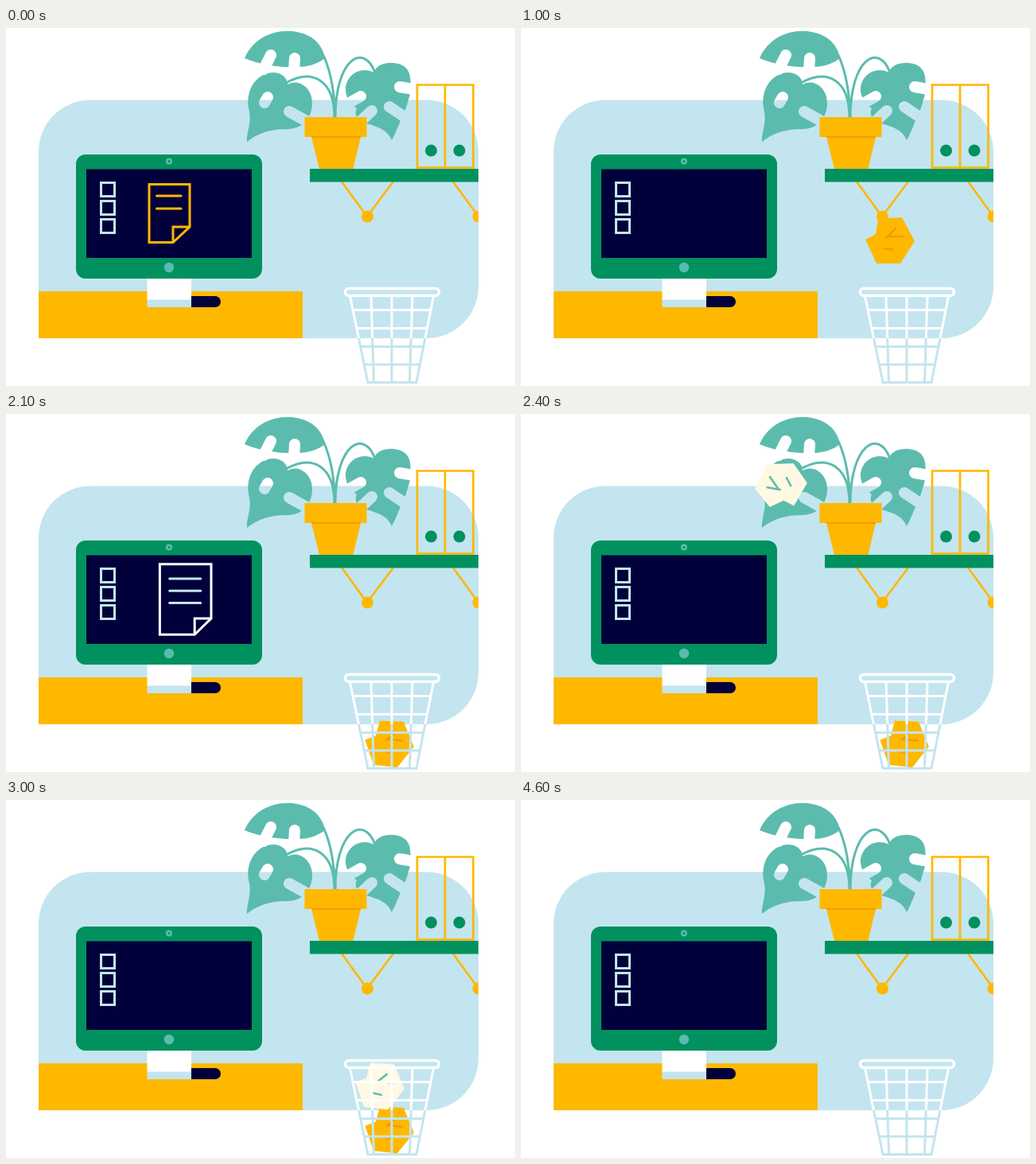
These frames come from a looping animation (640x450 px, 4950 ms). An HTML page:

```html
<!DOCTYPE html>
<html lang="en">
<head>
<meta charset="utf-8">
<title>Paper toss</title>
<style>
  html, body { margin: 0; width: 100%; height: 100%; overflow: hidden; background: #fff; }
  svg { display: block; width: 100%; height: 100%; }
</style>
</head>
<body>
<svg viewBox="0 0 640 450" fill="none">
  <defs>
    <linearGradient id="wire" gradientUnits="userSpaceOnUse" x1="0" y1="0" x2="0" y2="450">
      <stop offset=".8667" stop-color="#fff"/><stop offset=".8667" stop-color="#c3e5ef"/>
    </linearGradient>
    <mask id="cuts" maskUnits="userSpaceOnUse" x="290" y="0" width="230" height="150">
      <path fill="#fff" d="M290 0H520V150H290Z"/>
      <path stroke="#000" stroke-width="14" stroke-linecap="round"
        d="M333 34L324 52M363 38L362 54M329 87L325 94M356 105L376 116M446 86L430 95M460 104L446 117M495 74L512 77M482 99L500 111"/>
    </mask>
    <clipPath id="wall"><path d="M0 0H594V450H0Z"/></clipPath>
    <path id="crumple" d="M-15 -28L15 -30L31 0L13 28L-17 28L-31 -2L-18 -9Z"/>
    <path id="creases" stroke-width="2.5" d="M-5 -4L8 -17M-3 -6L17 -6M-9 9L4 10.5"/>
  </defs>

  <path fill="#c3e5ef" d="M41 390V155A65 65 0 0 1 106 90.500H529A65 65 0 0 1 594 155V325A65 65 0 0 1 529 390Z"/>
  <path fill="#ffb800" d="M41 331H373V390H41Z"/>

  <!-- monitor -->
  <rect x="88" y="159" width="234" height="156" rx="12" fill="#00915f"/>
  <path fill="#02003a" d="M101 177.500H309V289H101ZM233 337H263A7 7 0 0 1 263 351H233Z"/>
  <circle cx="205" cy="167.500" r="4" fill="#5bbcae"/>
  <circle cx="205" cy="167.500" r="1.500" fill="#00915f"/>
  <circle cx="205" cy="301" r="6.200" fill="#5bbcae"/>
  <path fill="#fff" d="M177.500 315H233V342H177.500Z"/>
  <path fill="#c3e5ef" d="M177.500 341.500H233V351H177.500Z"/>
  <path stroke="#c3e5ef" stroke-width="3" d="M119.500 194.500h17v17h-17zm0 23h17v17h-17zm0 23h17v17h-17z"/>

  <!-- plant -->
  <path stroke="#5bbcae" stroke-width="3" d="M413 113C414 86 409 56 399 34M413 113C413 66 386 50 352 69M414 113C414 38 450 18 464 56"/>
  <g fill="#5bbcae" mask="url(#cuts)">
    <path d="M300 38C312 10 342 0 366 5C388 9 399 24 401 38C392 45 380 49 367 49C345 50 318 46 300 38Z"/>
    <path d="M303 143C302 131 310 118 305 101C301 75 317 56 336 56C347 56 354 63 354 71C368 63 385 75 385 94C385 104 382 112 375 119C364 130 350 126 338 128C325 130 313 135 303 143Z"/>
    <path d="M485 141C479 128 470 126 460 122C446 118 436 112 441 101C431 95 426 84 427 74C430 57 447 48 463 56C465 46 478 43 488 44C500 45 507 52 508 61C509 70 510 80 506 90C504 98 502 104 498 112C494 121 490 132 485 141Z"/>
  </g>
  <path fill="#ffb800" d="M375.500 112H453.500V137H446L436.500 177H394L384 137H375.500Z"/>
  <path stroke="#f59b00" stroke-width="2" d="M384 137H446"/>

  <!-- shelf -->
  <g clip-path="url(#wall)">
    <path stroke="#ffb800" stroke-width="2.700" d="M517 71.500H587.500V175.500H517ZM552 71.500V176M422 193L454 237L487 193M562 193L594 237"/>
    <g fill="#ffb800"><circle cx="454.500" cy="237" r="7.500"/><circle cx="594" cy="237" r="7.500"/></g>
    <g fill="#00915f"><circle cx="534.500" cy="154" r="7.500"/><circle cx="570" cy="154" r="7.500"/></g>
    <path fill="#00915f" d="M382 177H594V193.500H382Z"/>
  </g>

  <!-- pages, drawn around their centres -->
  <g id="page0" stroke="#ffb800" stroke-width="3">
    <path d="M-25.500 -36.500H25.500V17L4.500 36.500H-25.500ZM4.500 36.500V17H25.500"/>
    <path stroke-linecap="round" d="M-16 -22H14.500M-16 -6H14.500"/>
  </g>
  <g id="page1" stroke="#fff" stroke-width="3">
    <path d="M-32.300 -44.300H32.300V24L11.500 44.300H-32.300ZM11.500 44.300V24H32.300"/>
    <path stroke="#c3e5ef" stroke-linecap="round" d="M-20 -26H19M-20 -10.700H19M-20 4.600H19"/>
  </g>
  <g id="ball0"><use href="#crumple" fill="#ffb800"/><use href="#creases" stroke="#f59b00"/></g>
  <g id="ball1"><use href="#crumple" fill="#fff9e3"/><use href="#creases" stroke="#5bbcae"/></g>

  <!-- bin -->
  <g stroke="url(#wire)" stroke-width="3">
    <path d="M432.500 337L455 445.500H516L537.500 337M459 337L462.500 445M485 337V445M511 337L507.500 445M436 354.500H534M441 377.500H529.500M445.500 400.500H525M450 423H520.500"/>
    <rect x="426.500" y="327.500" width="118" height="9" rx="4.500" stroke-width="3.500"/>
  </g>
  <path id="burst" stroke="#00915f" stroke-width="5.500" stroke-linecap="round"/>
</svg>
<script>
const LOOP = 4950, STEP = 50;
const $ = id => document.getElementById(id);
const clamp = v => Math.max(0, Math.min(1, v));

// One entry per sheet; flight holds [time after start, x, y].
const sheets = [
  { start: 0, pop: 4350, x: 205.5, turn: 6,
    flight: [[600, 251.5, 233], [770, 350, 92], [880, 424, 152], [1000, 464, 268], [1100, 476, 340], [1220, 482, 415]] },
  { start: 1650, pop: 3850, x: 203.6, turn: 6,
    flight: [[600, 249.6, 233], [770, 338, 80], [880, 404, 147], [1000, 443.5, 264], [1100, 461, 325], [1170, 470, 360]] }
];

// Smooth curve through the keys.
function along(keys, t) {
  const last = keys.length - 1;
  if (t >= keys[last][0]) return keys[last].slice(1);
  let i = 0;
  while (t >= keys[i + 1][0]) i++;
  const a = keys[i], b = keys[i + 1], span = b[0] - a[0], u = (t - a[0]) / span;
  const slope = (j, c) => {
    const p = keys[Math.max(0, j - 1)], q = keys[Math.min(last, j + 1)];
    return (q[c] - p[c]) / (q[0] - p[0]) * span;
  };
  return [1, 2].map(c =>
    a[c] * (1 + 2 * u) * (1 - u) ** 2 + b[c] * u * u * (3 - 2 * u) +
    slope(i, c) * u * (1 - u) ** 2 - slope(i + 1, c) * u * u * (1 - u));
}

function slide(p) {
  if (p < 0) return -40 * clamp(-(p + 50) / 450) ** 2;
  return p <= 550 ? 33 * (p / 550) ** 2 : 33 + 13 * (p - 550) / 50;
}

function place(el, x, y, angle, scale, opacity) {
  el.setAttribute("transform", `translate(${x} ${y}) rotate(${angle}) scale(${scale})`);
  el.setAttribute("opacity", opacity);
}

function burst([x, y], k) {
  let d = "";
  for (let i = 0; i < 8; i++) {
    const a = i * Math.PI / 4 - .03, outer = i % 2 ? 61 : 75, inner = 44 + (outer - 44) * k;
    const at = r => `${x + r * Math.cos(a)} ${y + r * Math.sin(a)}`;
    d += `M${at(inner)}L${at(outer)}`;
  }
  return d;
}

function draw(t) {
  let rays = "";
  sheets.forEach((s, i) => {
    const p = t - s.start, gone = clamp((t - s.pop - 50) / 200);
    const [x, y] = p < 600 ? [s.x + slide(p), 233] : along(s.flight, p);
    const fold = clamp((p - 600) / 100);
    place($("page" + i), x, y, 30 * fold, 1 - .25 * fold,
      p < 700 ? clamp((p + 500) / 150) : 0);
    const angle = p < 1000 ? (p - 1000) * .5 : s.turn * clamp((p - 1000) / 170);
    place($("ball" + i), x, y, angle, 1 - gone, p >= 700 && gone < 1 ? 1 : 0);
    if (t >= s.pop && gone < 1) rays += burst([x, y], gone);
  });
  $("burst").setAttribute("d", rays);
}

const begin = performance.now();
function tick() {
  const t = (performance.now() - begin) % LOOP;
  draw(Math.floor(t / STEP) * STEP);
  requestAnimationFrame(tick);
}
tick();
</script>
</body>
</html>
```
